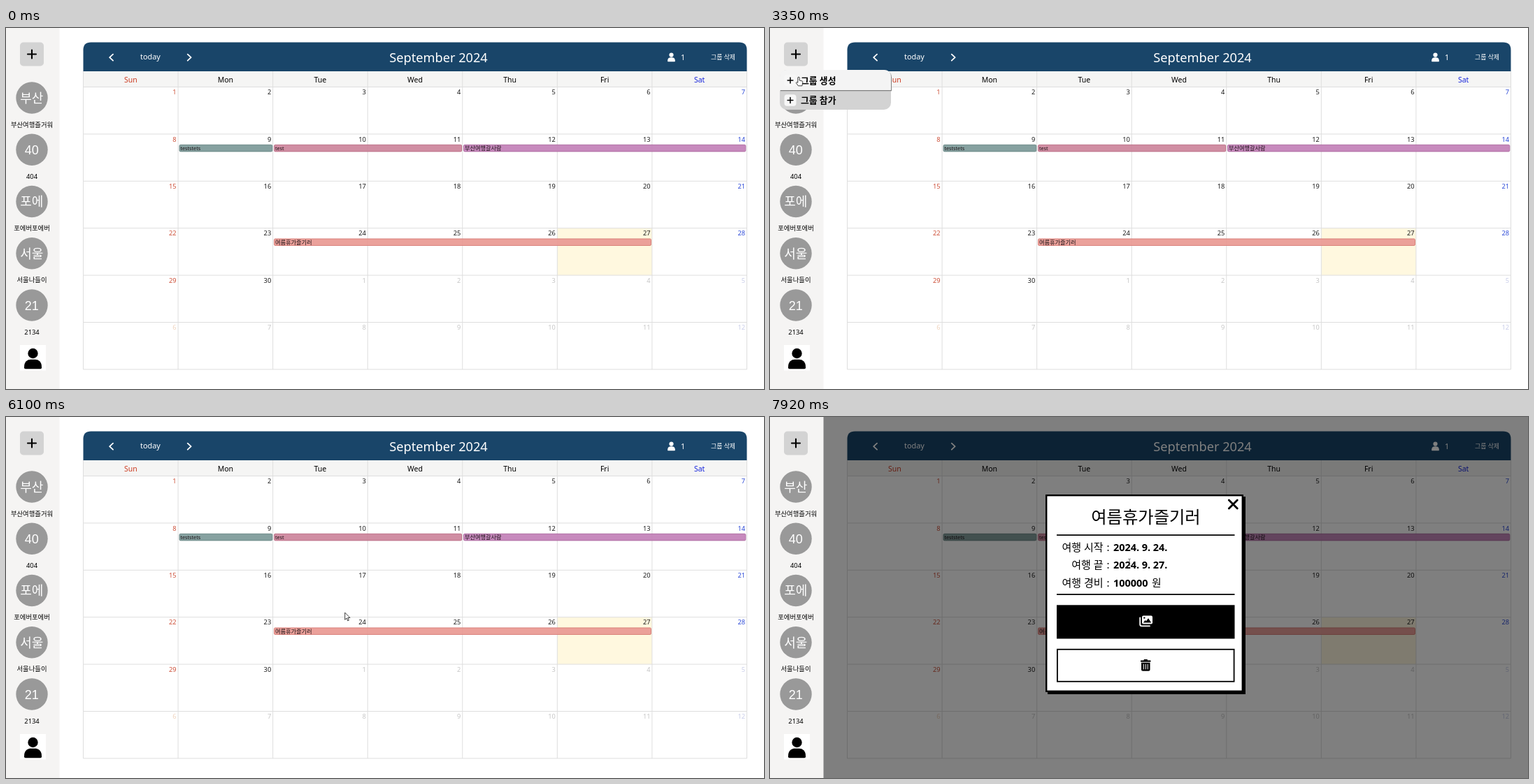
These frames come from a looping animation (1084 px wide and 517 px high, 7990 ms). An HTML page:

```html
<!DOCTYPE html>
<html lang="ko">
<head>
<meta charset="utf-8">
<title>Group calendar</title>
<style>
  html, body { margin: 0; width: 100%; height: 100%; overflow: hidden; background: #fff; }
  svg { display: block; width: 1084px; height: 517px; }
  text { font-family: "Noto Sans", "Noto Sans CJK KR", "Noto Sans CJK", sans-serif; white-space: pre; }
  .arial { font-family: "Liberation Sans", "Noto Sans CJK KR", "Noto Sans CJK", sans-serif; }
</style>
</head>
<body>
<svg id="stage" viewBox="0 0 1084 517" xmlns="http://www.w3.org/2000/svg"></svg>
<script>
const LOOP = 7990;

// ---- drawing helpers ----
const rect = (x, y, w, h, fill, r = 0, extra = '') =>
  `<rect x="${x}" y="${y}" width="${w}" height="${h}" rx="${r}" fill="${fill}" ${extra}/>`;
const path = (d, fill, extra = '') => `<path d="${d}" fill="${fill}" ${extra}/>`;
const line = (d, color, width, cap = 'butt') =>
  path(d, 'none', `stroke="${color}" stroke-width="${width}" stroke-linecap="${cap}" stroke-linejoin="round"`);
const circle = (x, y, r, fill, extra = '') => `<circle cx="${x}" cy="${y}" r="${r}" fill="${fill}" ${extra}/>`;
const group = (id, body) => `<g id="${id}" opacity="0">${body}</g>`;

// y is the vertical middle of the capitals
const text = (s, x, y, size, { color = '#000', weight = 400, anchor = 'middle', cls = '' } = {}) =>
  `<text x="${x}" y="${y + size * 0.36}" font-size="${size}" font-weight="${weight}" fill="${color}" text-anchor="${anchor}" class="${cls}">${s}</text>`;

const plus = (x, y, r, color, width) =>
  line(`M${x - r} ${y}h${2 * r}M${x} ${y - r}v${2 * r}`, color, width, 'round');
const person = (x, y, k, color) =>
  `<g transform="translate(${x} ${y}) scale(${k})">` + circle(0, -7, 7.2, color) +
  path('M-12.5 13.5V12.5C-12.5 5 -8 1.8 -3 1.8H3C8 1.8 12.5 5 12.5 12.5V13.5Q12.5 15.2 10.8 15.2H-10.8Q-12.5 15.2 -12.5 13.5Z', color) + '</g>';

// ---- calendar ----
const COL = 135.57, ROW = 67.4, LEFT = 110.5, TOP = 84.5;
const colX = i => LEFT + COL * i;
const rowY = i => TOP + ROW * i;

function dayColor(col, other) {
  if (col === 0) return other ? '#f0d3bd' : '#cd4f38';
  if (col === 6) return other ? '#c9cde9' : '#2f4cd8';
  return other ? '#c6c6c6' : '#1c1c1c';
}

function eventBar(label, x, end, y, fill, edge, size) {
  return rect(x, y, end - x, 9.6, fill, 1.6, `fill-opacity=".93" stroke="${edge}" stroke-width=".8"`) +
    text(label, x + 1.4, y + 5, size, { anchor: 'start', color: '#1a1014' });
}

function calendar() {
  let out = path('M110.5 62V31.5Q110.5 20.5 121.5 20.5H1048.5Q1059.5 20.5 1059.5 31.5V62Z', '#194569');
  out += line('M153 37.7L148.2 42.2L153 46.7M259.8 37.7L264.6 42.2L259.8 46.7', '#fff', 1.8, 'round');
  out += text('today', 206.5, 41.5, 10.9, { color: '#fff', weight: 500 });
  out += text('September 2024', 618.5, 42, 18.2, { color: '#fff' });
  out += person(951.5, 41.6, 0.43, '#fff');
  out += text('1', 968, 42, 10.8, { color: '#fff', weight: 500 });
  out += text('그룹 삭제', 1025.5, 42, 8.9, { color: '#fff' });

  out += rect(LEFT, 62, COL * 7, 22.5, '#f5f5f4');
  out += rect(colX(5), rowY(3), COL, ROW, '#fff8df');
  let grid = `M${LEFT} 62V489M${colX(7)} 62V489`;
  for (let i = 1; i < 7; i++) grid += `M${colX(i)} 62V489`;
  for (let i = 0; i < 7; i++) grid += `M${LEFT} ${rowY(i)}H${colX(7)}`;
  out += line(grid, '#dedede', 1);

  ['Sun', 'Mon', 'Tue', 'Wed', 'Thu', 'Fri', 'Sat'].forEach((name, i) => {
    const color = i === 0 ? '#cc3c22' : i === 6 ? '#1726dc' : '#000';
    out += text(name, colX(i) + COL / 2, 74, 10.5, { color });
  });
  for (let i = 0; i < 42; i++) {
    const col = i % 7, other = i >= 30;
    out += text(other ? i - 29 : i + 1, colX(col + 1) - 2.4, rowY(Math.floor(i / 7)) + 7.4, 9.3,
      { anchor: 'end', color: dayColor(col, other) });
  }
  out += eventBar('teststets', 248, 380.8, 167.3, '#7d9a99', '#5d7d7b', 7.2);
  out += eventBar('test', 383.5, 651.8, 167.3, '#cd869c', '#b5637c', 7.2);
  out += eventBar('부산여행갈사람', 654.5, 1057.8, 167.3, '#c382b8', '#a65d99', 8.2);
  out += eventBar('여름휴가즐기러', 383.5, 922.5, 301.9, '#ea9a94', '#d3706a', 8.2);
  return out;
}

// ---- sidebar, menu, card ----
const plusButton = (fill, color) => rect(20, 20.5, 34, 34, fill, 5) + plus(37, 37.5, 6, color, 2.1);

function sidebar() {
  const items = [['부산', '부산여행즐거워'], ['40', '404'], ['포에', '포에버포에버'], ['서울', '서울나들이'], ['21', '2134']];
  let out = rect(0, 0, 76.5, 517, '#f5f4f3') + plusButton('#d3d3d3', '#000');
  out += group('darkPlus', plusButton('#2d3c4e', '#fff'));
  items.forEach(([mark, name], i) => {
    const y = 100 + 74.25 * i;
    out += circle(37, y, 22.7, '#999');
    out += text(mark, 36.7, y + 0.5, 18, { color: '#fff', cls: 'arial' });
    out += text(name, 37, y + 38.2, 9.35, { weight: 500 });
  });
  return out + rect(20, 454, 37, 36.5, '#fff') + person(38.5, 473, 1, '#000');
}

function menu() {
  const item = (label, y) => rect(20.5, y - 8.3, 17, 16.6, '#f7f7f7', 4) + plus(29, y, 3.9, '#000', 1.5) +
    text(label, 44, y, 12.8, { weight: 700, anchor: 'start' });
  const top = 'M14 89V70Q14 60 24 60H163Q173 60 173 70V89Z';
  return rect(14, 60, 159, 57, '#d3d3d3', 10) +
    group('itemHover', path(top, '#808080', 'transform="translate(1 1.3)"') + path(top, '#f4f4f4')) +
    item('그룹 생성', 75) + item('그룹 참가', 103.5);
}

function card() {
  return rect(43.5, 339, 171, 142, '#bbb', 11) + rect(42.5, 338, 171, 142, '#fff', 11) +
    path('M42.5 383.5V349Q42.5 338 53.5 338H202.5Q213.5 338 213.5 349V383.5Z', '#fca41f') +
    circle(130.5, 380.3, 23.7, '#fca41f', 'stroke="#000" stroke-width="3.6"') +
    circle(130.5, 380.3, 11.3, '#000') +
    path('M121.5 376L124 372.5L130 371L132 373.5L128.5 376L130 378L126.5 379.5L129 382.5L133 383.5L131.5 387L128.5 390L127 385Z', '#fca41f') +
    path('M134.5 372L138.5 374.5L140 379L136.5 380L134.5 377Z', '#fca41f') +
    text('tori48', 127.5, 424, 11.6, { weight: 700 }) +
    text('데모이용자', 127.5, 443, 10.65, { color: '#444' }) +
    rect(43, 457, 170, 17, '#efefef') +
    text('로그아웃', 127.5, 465.8, 8, { weight: 700 });
}

// ---- dialogs ----
function newGroup() {
  return rect(0, 0, 1084, 517, '#000', 0, 'fill-opacity=".4"') +
    rect(428.5, 107, 225.5, 197.5, '#fff', 12) +
    text('그룹 추가', 538, 131.5, 20, { weight: 700 }) +
    line('M636.8 124.8l4.4 4.4m0 -4.4l-4.4 4.4', '#777', 1) +
    line('M440 143.7H642.5', '#8c8c8c', 1) +
    text('새로운 그룹에 이름을 부여해', 541.3, 160.7, 11, { color: '#222' }) +
    text('동료들과 함께해 보세요', 541.3, 174.7, 11, { color: '#222' }) +
    text('새 그룹 명', 440, 209, 8.4, { weight: 700, anchor: 'start' }) +
    rect(440, 222, 202.5, 25, '#d3d3d3') +
    rect(584.5, 270, 53.5, 21.5, '#d3d3d3', 3) +
    text('만들기', 611, 280.7, 9.4, { color: '#fff', weight: 700 });
}

function trip() {
  const row = (label, value, y) => text(label, 476.5, y, 15, { anchor: 'end' }) + text(':', 483.5, y, 15) +
    text(value, 491, y, 14.4, { weight: 700, anchor: 'start' });
  const photos = line('M529.2 287.5V297Q529.2 299.3 531.5 299.3H543', '#fff', 1.8, 'round') +
    rect(532, 284.5, 15, 12, '#fff', 2) + circle(535.3, 287.6, 1.2, '#000') +
    path('M533.8 294.6L536.6 291L538 292.3L541 288.3L545.2 294.6Z', '#000');
  const bin = rect(530, 348.6, 14.5, 2.1, '#000', 0.6) +
    path('M534.2 348.8L535 346.9H539.5L540.3 348.8Z', '#000') +
    path('M531 351.8H543.5V361.8Q543.5 363.8 541.5 363.8H533Q531 363.8 531 361.8Z', '#000') +
    line('M534.3 353.8v7.6M537.25 353.8v7.6M540.2 353.8v7.6', '#fff', 1);
  return rect(76.5, 0, 1007.5, 517, '#000', 0, 'fill-opacity=".5"') +
    rect(397, 114, 283, 283, '#000') +
    rect(395.2, 112.2, 280.6, 280.6, '#fff', 0, 'stroke="#000" stroke-width="2.4"') +
    line('M656.3 119L668.3 131M668.3 119L656.3 131', '#000', 2.8, 'round') +
    text('여름휴가즐기러', 537.5, 143.5, 24.3, { weight: 500 }) +
    line('M410 169.2H664.5M410 254.2H664.5', '#000', 1.8) +
    row('여행 시작', '2024. 9. 24.', 186.5) +
    row('여행 끝', '2024. 9. 27.', 212) +
    row('여행 경비', '100000', 237.5) +
    text('원', 546, 237.5, 14.8, { anchor: 'start' }) +
    rect(410, 269.3, 254.5, 48.2, '#000') +
    group('photoHover', rect(410, 269.3, 254.5, 48.2, '#010508')) + photos +
    rect(410.9, 332.8, 252.7, 46, '#fff', 0, 'stroke="#000" stroke-width="1.8"') + bin;
}

// ---- pointers, hot spot at 0,0 ----
const outlined = 'stroke="#111" stroke-width=".8" stroke-linejoin="round"';
const pointers = {
  arrow: path('M0 0V10.2L2.4 8L4 11.7L5.7 11L4.1 7.4H7.3Z', '#fff', outlined),
  hand: path('M-1.2 .8Q0 -.6 1.1 .8V5L5 6Q6 6.4 5.8 7.6L4.9 12.8H-.6L-3.7 8.6Q-3.6 6.8 -1.2 8.2Z', '#fff', outlined),
  beam: line('M-1.6 -4.8Q0 -4.8 0 -4V4Q0 4.8 -1.6 4.8M1.6 -4.8Q0 -4.8 0 -4M0 4Q0 4.8 1.6 4.8', '#444', 0.8)
};

const stage = document.getElementById('stage');
stage.innerHTML = rect(0, 0, 1084, 517, '#fff') + calendar() + sidebar() +
  group('menu', menu()) + group('card', card()) + group('newGroup', newGroup()) + group('trip', trip()) +
  `<g id="pointer">${Object.entries(pointers).map(([id, body]) => group(id, body)).join('')}</g>`;

// ---- motion: [time, value...], linear between steps ----
const fades = {
  darkPlus: [[950, 0], [1140, 1], [1590, 1], [1830, 0]],
  menu: [[1430, 0], [1740, 1], [4690, 1], [4890, 0]],
  itemHover: [[1690, 0], [1850, 1], [2329, 1], [2330, 0], [3349, 0], [3350, 1], [3430, 1], [3540, 0]],
  card: [[4309, 0], [4310, 1], [5359, 1], [5360, 0]],
  newGroup: [[2270, 0], [2530, 1], [3349, 1], [3350, 0]],
  trip: [[6429, 0], [6430, 1]],
  photoHover: [[6429, 0], [6430, 1], [6900, 1], [7050, 0]]
};
const route = [
  [200, 1007, 501], [560, 420, 250], [800, 95, 85], [940, 32, 53], [1010, 31, 43], [1530, 31, 43],
  [1700, 39, 64], [1860, 41, 70], [3400, 41, 70], [3750, 60, 260], [4100, 46, 467], [4170, 42, 466],
  [4310, 39, 466], [4650, 39, 466], [4900, 120, 430], [5170, 278, 357], [5490, 555, 202], [5560, 554, 204],
  [5950, 500, 262], [6300, 464.5, 304], [6520, 464.5, 304], [6800, 520, 288], [7000, 600, 262],
  [7180, 640, 250], [7450, 570, 130], [7660, 430, 170], [7920, 514, 208]
];
const shapes = [
  [0, ''], [200, 'arrow'], [1010, 'hand'], [1640, 'arrow'], [1700, 'hand'], [2330, 'arrow'], [3350, 'hand'],
  [3480, 'arrow'], [4170, 'hand'], [4700, 'arrow'], [6240, 'hand'], [6960, 'arrow'], [7760, 'beam']
];

function at(steps, t) {
  const next = steps.findIndex(s => s[0] > t);
  if (next === 0) return steps[0].slice(1);
  if (next < 0) return steps[steps.length - 1].slice(1);
  const a = steps[next - 1], b = steps[next], k = (t - a[0]) / (b[0] - a[0]);
  return a.slice(1).map((v, i) => v + (b[i + 1] - v) * k);
}

const parts = {};
for (const id of [...Object.keys(fades), ...Object.keys(pointers), 'pointer']) parts[id] = document.getElementById(id);

function draw(t) {
  for (const id in fades) parts[id].setAttribute('opacity', at(fades[id], t)[0]);
  const [x, y] = at(route, t);
  parts.pointer.setAttribute('transform', `translate(${x} ${y})`);
  const shape = shapes.filter(s => s[0] <= t).pop()[1];
  for (const id in pointers) parts[id].setAttribute('opacity', id === shape ? 1 : 0);
}

const start = performance.now();
function frame() {
  draw((performance.now() - start) % LOOP);
  requestAnimationFrame(frame);
}
frame();
</script>
</body>
</html>
```
